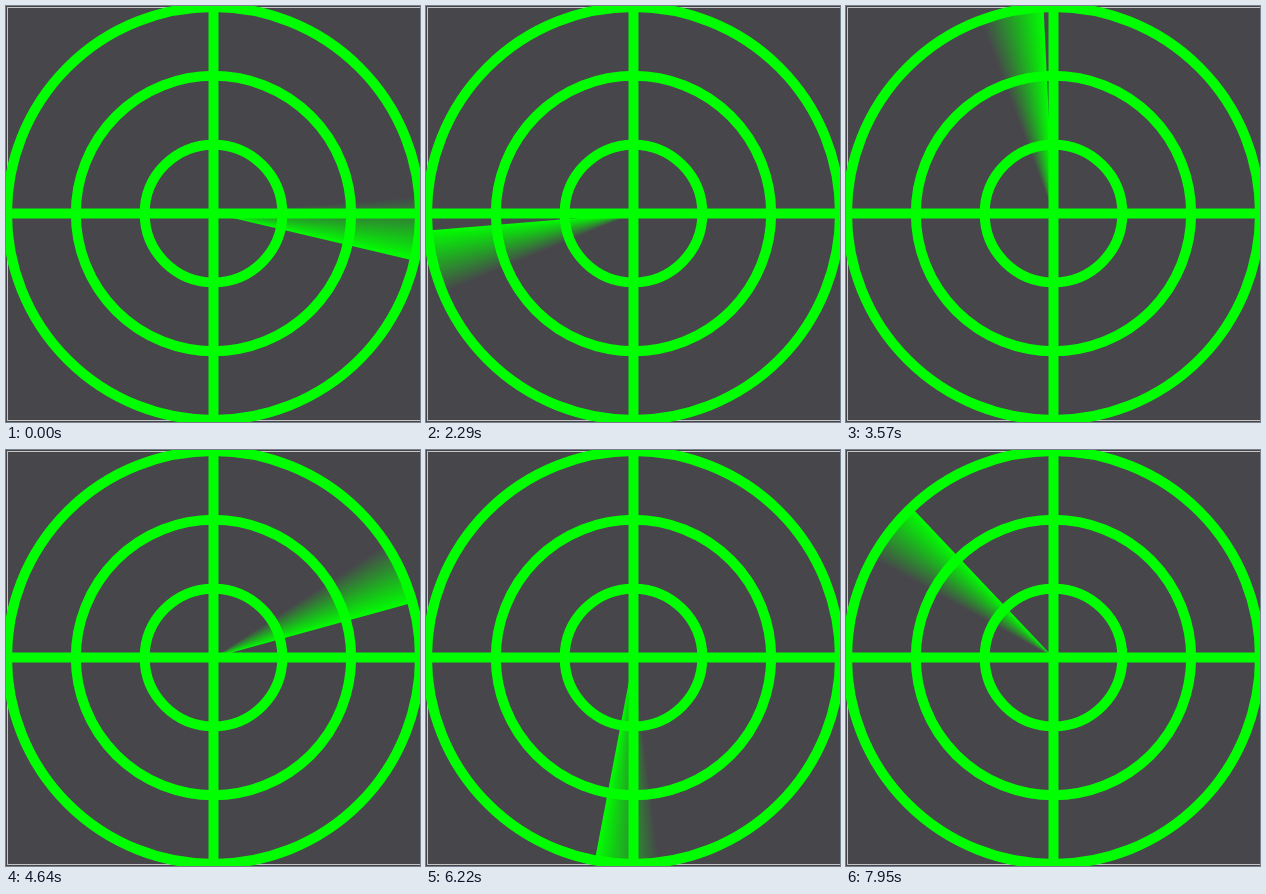
These frames come from a looping animation (414x416 px, 8 s). An HTML page with a canvas:

```html
<!DOCTYPE html>
<html lang="en">
<head>
<meta charset="utf-8">
<title>Radar sweep</title>
<style>
  html, body { margin: 0; width: 100%; height: 100%; overflow: hidden; background: #47464b; }
  canvas { display: block; }
</style>
</head>
<body>
<canvas id="radar" width="414" height="416"></canvas>
<script>
const ctx = document.getElementById('radar').getContext('2d');
const LOOP = 8000, CENTER = 207.5, RADIUS = 206.5, TAIL = Math.PI / 10;
const BACK = '#47464b', GREEN = '#00ff00', CLEAR = 'rgba(0,255,0,0)';

// The sweep turns in even steps, slightly slower at first.
const keys = [
  { time: 0, step: 0, angle: 13.2 },
  { time: 2275, step: 34, angle: 175.3 },
  { time: 7945, step: 119, angle: 586.6 }
];

function angleAt(time) {
  const [from, to] = time < keys[1].time ? keys : keys.slice(1);
  const count = to.step - from.step;
  const progress = (time - from.time) / (to.time - from.time);
  const done = Math.min(Math.floor(progress * count), count);
  return (from.angle + (to.angle - from.angle) * done / count) * Math.PI / 180;
}

function drawSweep(lead) {
  const fade = ctx.createConicGradient(0, 0, 0);
  fade.addColorStop(0, CLEAR);
  fade.addColorStop(TAIL / (2 * Math.PI), GREEN);
  fade.addColorStop(0.5, GREEN);
  fade.addColorStop(0.5, CLEAR);
  ctx.save();
  ctx.translate(CENTER, CENTER);
  ctx.rotate(lead - TAIL);
  ctx.beginPath();
  ctx.moveTo(0, 0);
  ctx.arc(0, 0, RADIUS, 0, TAIL);
  ctx.closePath();
  ctx.fillStyle = fade;
  ctx.fill();
  ctx.restore();
}

function drawBorder() {
  ctx.strokeStyle = '#c4c4c6';
  ctx.lineWidth = 1;
  ctx.strokeRect(1.5, 1.5, 413, 413);
}

function drawGrid() {
  ctx.strokeStyle = GREEN;
  ctx.lineWidth = 10;
  for (const part of [1, 2, 3]) {
    ctx.beginPath();
    ctx.arc(CENTER, CENTER, RADIUS * part / 3, 0, 2 * Math.PI);
    ctx.stroke();
  }
  ctx.beginPath();
  ctx.moveTo(CENTER, CENTER - RADIUS);
  ctx.lineTo(CENTER, CENTER + RADIUS);
  ctx.moveTo(CENTER - RADIUS, CENTER);
  ctx.lineTo(CENTER + RADIUS, CENTER);
  ctx.stroke();
}

function draw(time) {
  ctx.fillStyle = BACK;
  ctx.fillRect(0, 0, 414, 416);
  drawBorder();
  drawSweep(angleAt(time));
  drawGrid();
}

const start = performance.now();
function tick() {
  draw((performance.now() - start) % LOOP);
  requestAnimationFrame(tick);
}
tick();
</script>
</body>
</html>
```
